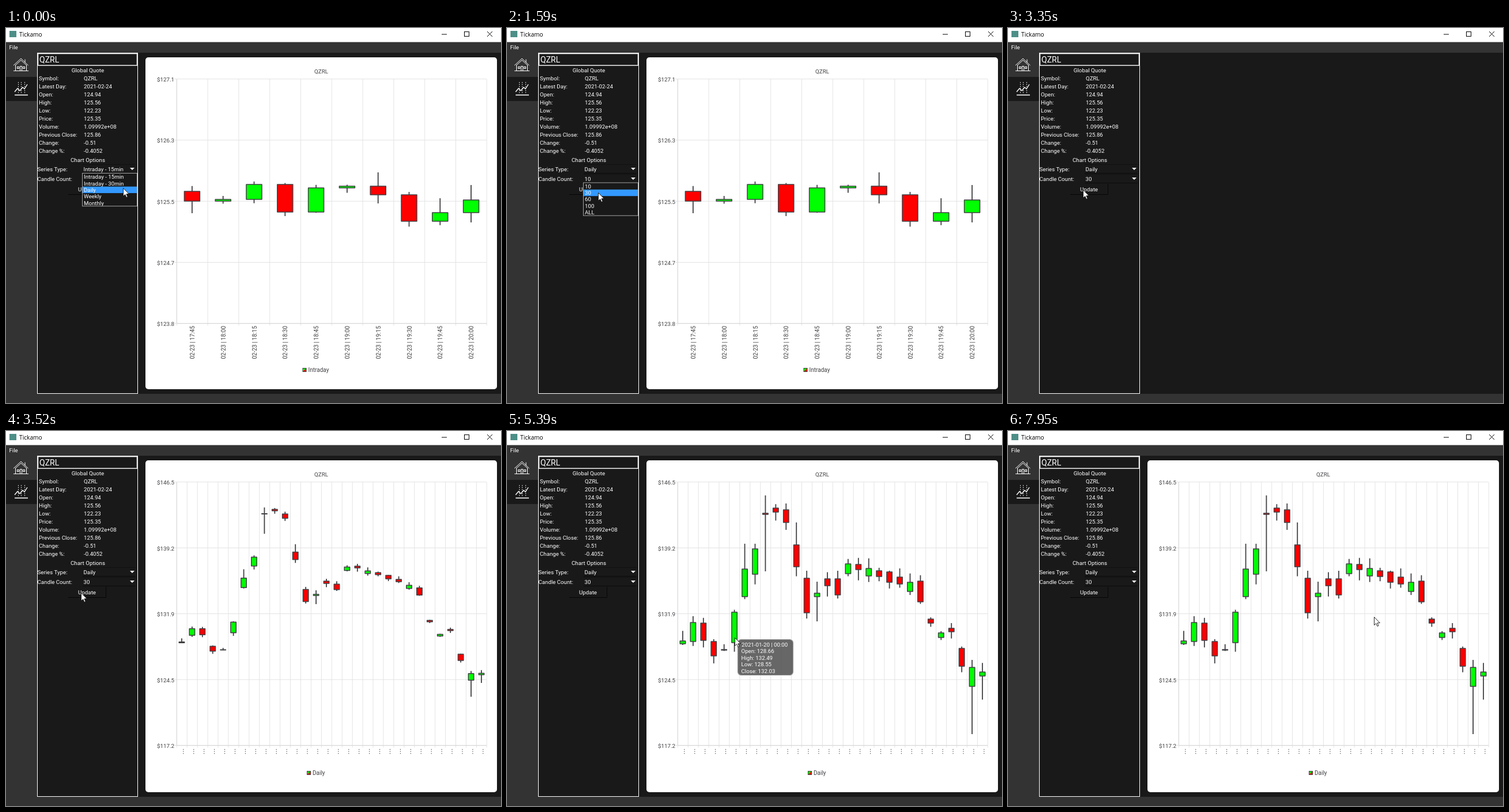
An HTML page with a canvas that plays this animation: 859 by 652 pixels, repeating every 8 s.

```html
<!DOCTYPE html>
<html lang="en">
<head>
<meta charset="utf-8">
<title>Tickamo</title>
<style>
html, body { margin: 0; width: 100%; height: 100%; overflow: hidden; background: #191919; }
canvas { display: block; }
</style>
</head>
<body>
<canvas id="stage" width="859" height="652"></canvas>
<script>
const g = document.getElementById('stage').getContext('2d');
const LOOP = 8000, SYMBOL = 'QZRL', INK = '#404044', DARK = '#191919';
const SANS = 'Roboto, sans-serif';

const clamp = v => Math.max(0, Math.min(1, v));
const mix = (a, b, k) => a + (b - a) * k;
const random = n => Math.abs(Math.sin(n * 12.9898) * 43758.5453) % 1;

// Opens and closes are y positions; spikes give long wicks by candle, negative upwards.
const walk = [284, 301, 298, 272, 320, 278, 275, 290, 336, 321, 299];
const intraday = {
  name: 'Intraday', bottom: 514, body: 27, markerX: 515, wick: 9, max: 127.12, min: 123.83,
  opens: walk.slice(0, -1), closes: walk.slice(1),
  spikes: { 0: [21], 6: [-24, 15], 8: [-25], 9: [-26, 17] }
};
const daily = {
  name: 'Daily', bottom: 547, body: 9.4, markerX: 522.5, wick: 18, max: 146.52, min: 117.2,
  opens: [370, 366, 334, 366, 381, 368, 288, 249, 143, 134, 137, 198, 256, 288, 257,
    257, 248, 232, 252, 243, 245, 254, 279, 261, 327, 359, 343, 378, 444, 426],
  closes: [365, 333, 364, 391, 380, 315, 240, 205, 145, 141, 159, 236, 316, 282, 269,
    285, 231, 241, 239, 253, 263, 266, 263, 297, 334, 351, 349, 409, 411, 419],
  spikes: { 6: [-44], 8: [-31, 99], 11: [-39], 13: [-20, 43], 28: [-13, 83], 29: [41] }
};

// Pointer moves: start, end, x, y.
const moves = [
  [0, 1, 203, 278], [300, 850, 206, 262], [1120, 1590, 158, 286], [2140, 2550, 130, 281],
  [4440, 4900, 408, 424], [4900, 5220, 395, 359], [6060, 6660, 431, 289],
  [6660, 6880, 417, 276], [7480, 7740, 545, 355], [7740, 7950, 635, 323]
];

function rect(x, y, w, h, color) {
  g.fillStyle = color;
  g.fillRect(x, y, w, h);
}

function box(x, y, w, h, color = '#fff', width = 1) {
  g.strokeStyle = color;
  g.lineWidth = width;
  g.strokeRect(x, y, w, h);
}

function trace(points) {
  g.beginPath();
  for (let i = 0; i < points.length; i += 2) g.lineTo(points[i], points[i + 1]);
}

function line(points, color = '#fff', width = 1) {
  g.strokeStyle = color;
  g.lineWidth = width;
  trace(points);
  g.stroke();
}

function shape(points, color) {
  g.fillStyle = color;
  trace(points);
  g.closePath();
  g.fill();
}

// y is the vertical middle of the capitals.
function text(s, x, y, color = '#fff', size = 9.7, align = 'left', family = SANS) {
  g.font = `${size}px ${family}`;
  g.textAlign = align;
  g.fillStyle = color;
  g.fillText(s, x, y + size * 0.36);
}

function drawWindow() {
  rect(0, 0, 859, 652, '#333');
  rect(0, 0, 859, 24.5, '#fff');
  rect(6, 5, 12, 11, '#4d8f88');
  text('Tickamo', 23, 11, '#000', 10.2, 'left', '"Open Sans", sans-serif');
  line([756, 11, 765, 11], '#000');
  box(795.5, 6.5, 8, 8, '#000');
  line([835, 6, 844, 15], '#000');
  line([844, 6, 835, 15], '#000');
  text('File', 5.5, 34);
  rect(54, 43, 805, 593, DARK);
  rect(0, 85, 54, 42, DARK);
  drawHouse();
  drawChartIcon();
}

function drawHouse() {
  line([13, 65, 26, 53, 38.5, 65]);
  line([16, 65, 26, 56, 36, 65]);
  line([33, 60, 33, 54.5]);
  line([16.5, 64, 16.5, 74.5, 35.5, 74.5, 35.5, 64]);
  line([13, 74.5, 39, 74.5]);
  for (const x of [19.5, 29.5]) box(x, 67.5, 3, 3);
  box(24.5, 66.5, 3, 8);
}

function drawChartIcon() {
  line([15, 111, 20, 105, 24, 109, 29, 103, 32, 106, 37, 98], '#fff', 1.4);
  line([15, 116.5, 38, 116.5], '#fff', 1.6);
  g.setLineDash([1.5, 2]);
  for (const x of [21.5, 26.5, 32.5]) line([x, 94, x, 114]);
  g.setLineDash([]);
}

function drawPanel(t) {
  box(54.5, 43.5, 174, 592);
  box(55.5, 44.5, 172, 20.5, '#e6e6e6', 1.6);
  text(SYMBOL, 58, 55, '#fff', 14);
  text('Global Quote', 142, 73, '#fff', 9.8, 'center');
  const quote = {
    'Symbol:': SYMBOL, 'Latest Day:': '2021-02-24', 'Open:': '124.94', 'High:': '125.56',
    'Low:': '122.23', 'Price:': '125.35', 'Volume:': '1.09992e+08',
    'Previous Close:': '125.86', 'Change:': '-0.51', 'Change %:': '-0.4052'
  };
  Object.entries(quote).forEach(([label, value], i) => {
    text(label, 57, 88 + 14 * i);
    text(value, 135, 88 + 14 * i);
  });
  text('Chart Options', 142, 229, '#fff', 9.8, 'center');
  combo('Series Type:', t < 120 ? 'Intraday - 15min' : 'Daily', 245);
  combo('Candle Count:', t < 1960 ? '10' : '30', 262);
  if (t >= 2740 && t < 2860) rect(108, 271, 65, 19, '#121212');
  line([108, 289.5, 173.5, 289.5, 173.5, 271], '#060606');
  text('Update', 140.5, 280.5, '#fff', 9.8, 'center');
  if (t < 120) popup(252, ['Intraday - 15min', 'Intraday - 30min', 'Daily', 'Weekly', 'Monthly'], 2);
  if (t >= 900 && t < 1960) popup(268.5, ['10', '30', '60', '100', 'ALL'], t < 1280 ? 0 : 1);
}

function combo(label, value, y) {
  text(label, 54.5, y + 0.5);
  text(value, 134.5, y + 0.5);
  line([133, y - 7.5, 225, y - 7.5], '#111');
  line([133, y + 7.5, 225, y + 7.5], '#0b0b0b');
  shape([215, y - 2, 223, y - 2, 219, y + 2], '#fff');
}

function popup(y, items, active) {
  const row = 11.35;
  rect(132, y, 96, 58, DARK);
  rect(133, y + 1 + row * active, 94, row, '#3399ff');
  items.forEach((item, i) => text(item, 135, y + 6.8 + row * i));
  box(132.5, y + 0.5, 95, 57.2, '#a4a4a4');
}

function drawChart(chart, grow) {
  const { bottom, max, min, markerX } = chart;
  const count = chart.opens.length, step = 538 / count;
  g.fillStyle = '#fff';
  g.beginPath();
  g.roundRect(242, 51, 610, 577, 5);
  g.fill();
  text(SYMBOL, 547, 75.5, INK, 9.8, 'center');

  for (let i = 0; i <= count; i++) {
    const x = 296.3 + i * step;
    line([x, 89, x, bottom + 3.5], '#e4e4e4');
  }
  for (let i = 0; i <= 4; i++) {
    const y = mix(88.7, bottom - 0.3, i / 4);
    line([292, y, 834, y], '#e2e2e2');
    text('$' + mix(max, min, i / 4).toFixed(1), 292, y + 0.8, INK, 9.8, 'right');
  }
  line([296.3, 89, 296.3, bottom - 0.3, 834, bottom - 0.3], '#d6d6d6');

  for (let i = 0; i < count; i++) {
    const x = 296 + (i + 0.5) * step;
    if (chart === daily) for (const y of [553, 556.5, 560]) rect(x + 2.3, y, 1.1, 1.3, INK);
    else timeLabel(x, 17.75 + i / 4);
    drawCandle(x, chart, i, grow);
  }

  rect(markerX, 591.5, 6, 6, '#f00');
  shape([markerX, 591.5, markerX + 6, 591.5, markerX, 597.5], '#0f0');
  box(markerX, 591.5, 6, 6, INK);
  text(chart.name, markerX + 9.5, 594.5, INK, 10);
}

function timeLabel(x, hours) {
  const minutes = String(hours % 1 * 60).padStart(2, '0');
  g.save();
  g.translate(x + 0.5, 518);
  g.rotate(-Math.PI / 2);
  text(`02-23 | ${Math.floor(hours)}:${minutes}`, 0, 0, INK, 10, 'right');
  g.restore();
}

// Every value grows out of the middle of the body.
function drawCandle(x, { opens, closes, spikes, wick, body }, i, grow) {
  const open = opens[i], close = closes[i], middle = (open + close) / 2;
  const spike = spikes[i] || [];
  const up = spike.find(v => v < 0) ?? -1 - wick * random(2 * i + 1);
  const down = spike.find(v => v > 0) ?? 1 + wick * random(2 * i + 2);
  const half = Math.abs(open - close) / 2 * grow;
  const top = middle - half, base = middle + half;
  line([x, top + up * grow, x, top], INK, 1.8);
  line([x, base, x, base + down * grow], INK, 1.8);
  rect(x - body / 2, top, body, 2 * half, open > close ? '#0f0' : '#f00');
  g.lineJoin = 'round';
  box(x - body / 2, top, body, 2 * half, INK, 1.5);
  g.lineJoin = 'miter';
}

function tooltip(x, y, alpha, day, prices) {
  if (alpha <= 0) return;
  g.globalAlpha = alpha;
  g.fillStyle = 'rgba(70, 70, 70, .82)';
  g.strokeStyle = '#999';
  g.lineWidth = 1.2;
  g.beginPath();
  g.roundRect(x + 0.5, y + 0.5, 96, 62, 6);
  g.fill();
  g.stroke();
  text(`2021-01-${day} | 00:00`, x + 7, y + 9.5);
  ['Open', 'High', 'Low', 'Close'].forEach((label, i) =>
    text(`${label}: ${prices[i]}`, x + 6.5, y + 21 + 11.4 * i));
  g.globalAlpha = 1;
}

function drawPointer(t) {
  let [, , x, y] = moves[0];
  for (const [start, end, toX, toY] of moves) {
    const k = clamp((t - start) / (end - start));
    x = mix(x, toX, k);
    y = mix(y, toY, k);
  }
  g.save();
  g.translate(Math.round(x) + 0.5, Math.round(y) + 0.5);
  shape([0, 0, 0, 14, 3.2, 11, 5.4, 16, 7.6, 15, 5.4, 10.3, 9.8, 10.1], '#fff');
  g.strokeStyle = '#111';
  g.lineWidth = 0.9;
  g.stroke();
  g.restore();
}

function draw(t) {
  drawWindow();
  drawPanel(t);
  if (t < 3350) drawChart(intraday, 1);
  else if (t >= 3460) drawChart(daily, 1 - (1 - clamp((t - 3430) / 900)) ** 4);
  if (t < 6080) tooltip(400, 362, clamp((t - 5250) / 130), '20', ['128.66', '132.49', '128.55', '132.03']);
  else if (t < 7480) tooltip(420, 278, clamp((t - 6850) / 80), '21', ['133.80', '139.67', '133.59', '136.87']);
  drawPointer(t);
}

function tick() {
  draw(performance.now() % LOOP);
  requestAnimationFrame(tick);
}
tick();
</script>
</body>
</html>
```
